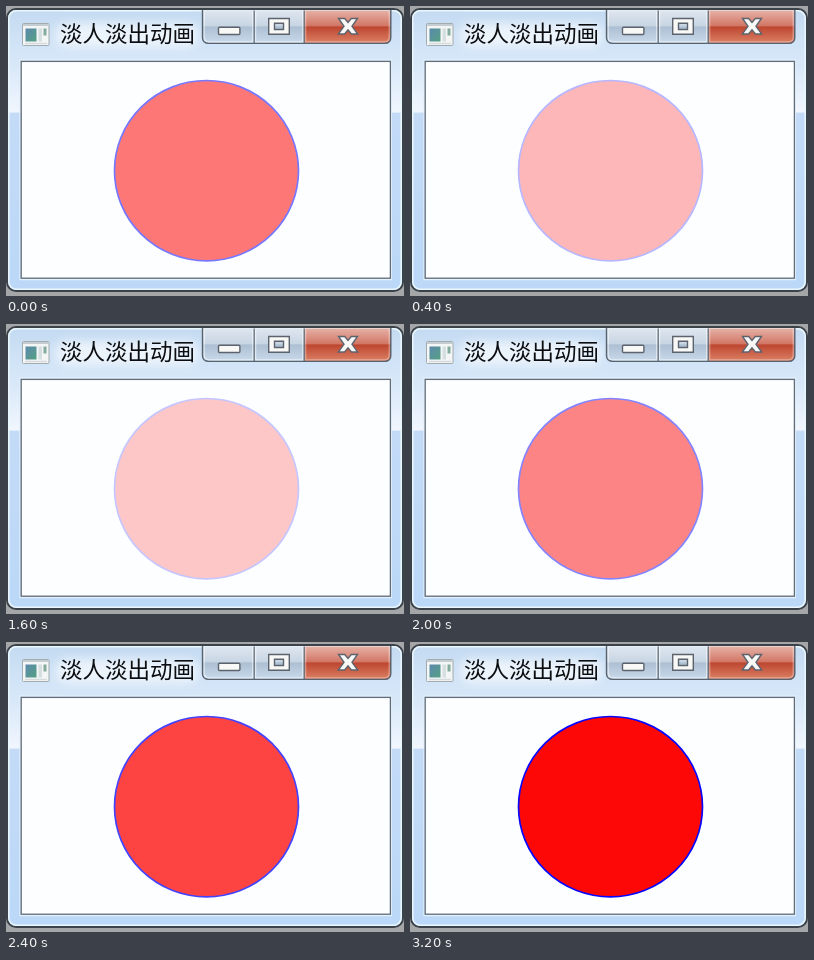
Write an HTML page that moves like this. It is 398 px wide and 290 px high and loops after 3.4 s.

```html
<!DOCTYPE html>
<html lang="zh-CN">
<head>
<meta charset="utf-8">
<style>
html, body { margin: 0; width: 100%; height: 100%; overflow: hidden; }
svg { display: block; width: 398px; height: 290px; }
text { font: 22.5px "Noto Sans CJK SC", "Noto Sans CJK", sans-serif; }
</style>
</head>
<body>
<svg viewBox="0 0 398 290" xmlns="http://www.w3.org/2000/svg">
  <defs>
    <linearGradient id="glass" x1="0" y1="0" x2="0" y2="1">
      <stop offset="0" stop-color="#c3daf1"/>
      <stop offset=".1" stop-color="#cfe2f6"/>
      <stop offset=".2" stop-color="#d8e8f9"/>
      <stop offset=".365" stop-color="#f1f6fe"/>
      <stop offset=".37" stop-color="#c3dbf7"/>
      <stop offset="1" stop-color="#bbd8f8"/>
    </linearGradient>
    <linearGradient id="plain" x1="0" y1="0" x2="0" y2="1">
      <stop offset="0" stop-color="#dfe7f0"/>
      <stop offset=".46" stop-color="#c8d5e3"/>
      <stop offset=".5" stop-color="#adbfd2"/>
      <stop offset="1" stop-color="#c9dbec"/>
    </linearGradient>
    <linearGradient id="red" x1="0" y1="0" x2="0" y2="1">
      <stop offset="0" stop-color="#e6b3a8"/>
      <stop offset=".46" stop-color="#d27766"/>
      <stop offset=".5" stop-color="#be4630"/>
      <stop offset="1" stop-color="#dc8468"/>
    </linearGradient>
    <linearGradient id="pane" x1="0" y1="0" x2="1" y2="1">
      <stop offset="0" stop-color="#5b89ac"/>
      <stop offset="1" stop-color="#56a084"/>
    </linearGradient>
    <filter id="blur" x="-20%" y="-60%" width="140%" height="220%"><feGaussianBlur stdDeviation="5"/></filter>
    <clipPath id="caps"><path d="M196.5 4.5H385V31.5Q385 37.5 379 37.5H203Q196.5 37.5 196.5 31.5Z"/></clipPath>
  </defs>

  <rect width="398" height="290" fill="#a4a6a8"/>
  <rect x="1" y="3" width="396" height="282" rx="9" fill="url(#glass)" stroke="#3c4249" stroke-width="2"/>
  <rect x="2.8" y="4.8" width="392.4" height="278.4" rx="7.5" fill="none" stroke="#eaf7fd" stroke-width="1.5"/>
  <rect x="50" y="17" width="142" height="24" rx="10" fill="#fff" opacity=".6" filter="url(#blur)"/>

  <g>
    <rect x="16.5" y="17.5" width="26.5" height="22" rx="1" fill="#f4f6f6" stroke="#a2abae"/>
    <path d="M17 19H43" stroke="#c4cdd2" stroke-width="2"/>
    <rect x="19.5" y="22.5" width="11" height="13" fill="url(#pane)"/>
    <rect x="32.5" y="22.5" width="3.5" height="13" fill="#d5dee0"/>
    <rect x="37.5" y="22.5" width="3" height="7" fill="#84ac9e"/>
    <path d="M19 37.5H41" stroke="#d5dadc" stroke-width="1.5"/>
  </g>
  <text x="54" y="36" fill="#0b0d10">淡人淡出动画</text>

  <g clip-path="url(#caps)">
    <rect x="196" y="4" width="103" height="34" fill="url(#plain)"/>
    <rect x="298" y="4" width="88" height="34" fill="url(#red)"/>
    <g fill="none" stroke="#fff" stroke-opacity=".55" stroke-width="1.3">
      <path d="M198.2 5V31Q198.2 35.8 203 35.8H246.7V5M249.6 5V35.8H296.7V5"/>
      <path d="M299.7 5V35.8H378.5Q383.2 35.8 383.2 31V5" stroke-opacity=".35"/>
    </g>
    <path d="M248.2 4V38M298.2 4V38" stroke="#67727f" stroke-width="1.3"/>
  </g>
  <path d="M196.5 4V31.5Q196.5 37.4 203 37.4H378.5Q384.8 37.4 384.8 31.5V4" fill="none" stroke="#596370" stroke-width="1.4"/>

  <g fill="#f8f8f7" stroke="#5d636d" stroke-width="1.4">
    <rect x="212.5" y="21.3" width="21.4" height="7.2" rx="1"/>
    <path fill-rule="evenodd" d="M262.7 12.5H283.3V28.2H262.7ZM268.5 17.2H277.5V23.5H268.5Z"/>
    <path d="M332.5 12.5H338.7L342 16.4L345.3 12.5H351.5L346 20.3L351.7 28H345.4L342 23.8L338.6 28H332.3L338 20.3Z"/>
  </g>

  <rect x="14" y="54" width="371.4" height="219.6" fill="none" stroke="#e3f1fb" stroke-width="1.2"/>
  <rect x="15.2" y="55.4" width="369.2" height="216.8" fill="#fdfeff" stroke="#626d79" stroke-width="1.3"/>
  <ellipse id="disc" cx="200.5" cy="164.7" rx="92" ry="90.2" fill="#f00" stroke="#00f" stroke-width="1.7"/>
</svg>
<script>
const STEP = 200, LOOP = 3400;
const disc = document.getElementById("disc");

// The fade advances once per tick and rests at both ends.
function opacityAt(ms) {
  const tick = Math.floor((ms % LOOP) / STEP);
  if (tick < 4) return 0.53 - 0.127 * tick;
  if (tick < 8) return 0.04;
  return Math.min(0.97, 0.217 + 0.129 * (tick - 8));
}

function draw(ms) {
  disc.setAttribute("opacity", opacityAt(ms).toFixed(3));
}

const start = performance.now();
function loop() {
  draw(performance.now() - start);
  requestAnimationFrame(loop);
}
loop();
</script>
</body>
</html>
```
